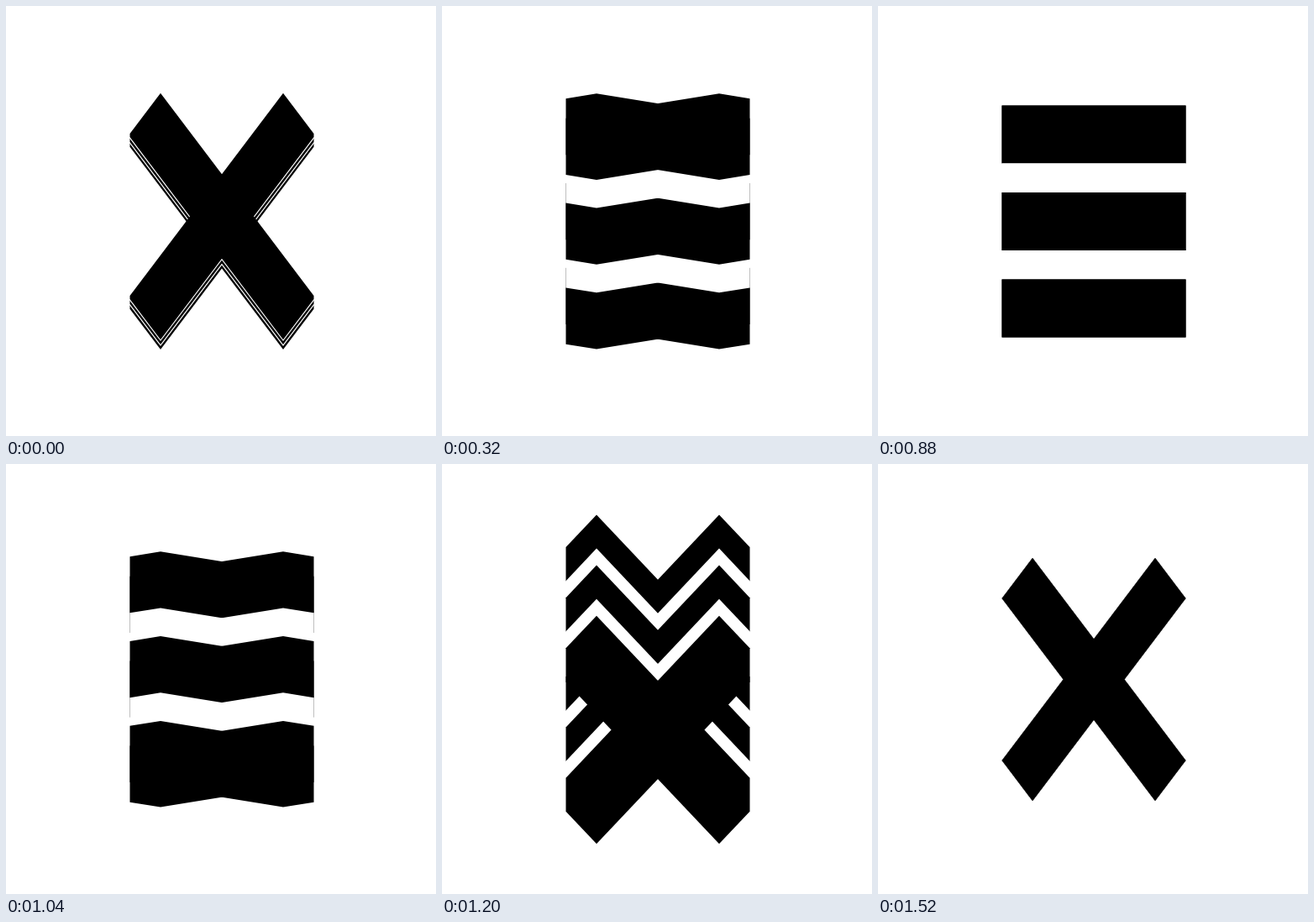
An HTML page with a canvas for the animation above (1920 ms loop, 512x512 px).

```html
<!DOCTYPE html>
<html lang="en">
<head>
<meta charset="utf-8">
<title>Menu and close icon</title>
<style>
  html, body { margin: 0; height: 100%; overflow: hidden; background: #fff; }
  canvas { display: block; width: 100%; height: 100%; }
</style>
</head>
<body>
<canvas id="stage" width="512" height="512"></canvas>
<script>
const ctx = document.getElementById('stage').getContext('2d');
const LOOP = 1920, STEP = 80, MIDDLE = 680;
const CENTER_X = 257, CENTER_Y = 256.4, HALF = 109.5, CAP = 36.5;
const BAR = 69, SLOPE = 1.322;

function easeInOut(time, start, end) {
  const x = Math.min(1, Math.max(0, (time - start) / (end - start)));
  return x < 0.5 ? 4 * x ** 3 : 1 - 4 * (1 - x) ** 3;
}

// One diagonal arm: a bar of the given thickness sheared into a hexagon.
function drawArm(y, slope, thickness, side) {
  const drop = slope * (HALF - CAP);
  const outer = drop + thickness / 2, inner = drop - thickness / 2;
  const tip = outer + slope * CAP;
  const points = [
    [-HALF, -outer], [CAP - HALF, -tip], [HALF, inner],
    [HALF, outer], [HALF - CAP, tip], [-HALF, -inner]
  ];
  ctx.beginPath();
  for (const [px, py] of points) ctx.lineTo(CENTER_X + side * px, y + py);
  ctx.fill();
}

function drawCross(y, slope, thickness, color) {
  ctx.fillStyle = color;
  drawArm(y, slope, thickness, 1);
  drawArm(y, slope, thickness, -1);
}

function draw(now) {
  const time = Math.floor(now % LOOP / STEP) * STEP;
  const distance = Math.abs(time - MIDDLE);
  const away = Math.min(distance, LOOP - distance);
  const slope = SLOPE * easeInOut(away, 203, 705);
  const thickness = BAR * (1 - easeInOut(away, 256, 816));
  const gap = thickness / 2;
  // The stack piles upwards while opening, downwards while closing.
  const direction = time < MIDDLE || time >= LOOP - STEP ? -1 : 1;

  ctx.fillStyle = '#fff';
  ctx.fillRect(0, 0, 512, 512);
  for (let i = -1; i <= 1; i++) {
    const y = CENTER_Y + direction * i * (thickness + gap);
    if (i > -1) drawCross(y - direction * gap, slope, thickness, '#fff');
    drawCross(y, slope, thickness, '#000');
  }
  requestAnimationFrame(() => draw(performance.now()));
}

draw(performance.now());
</script>
</body>
</html>
```
